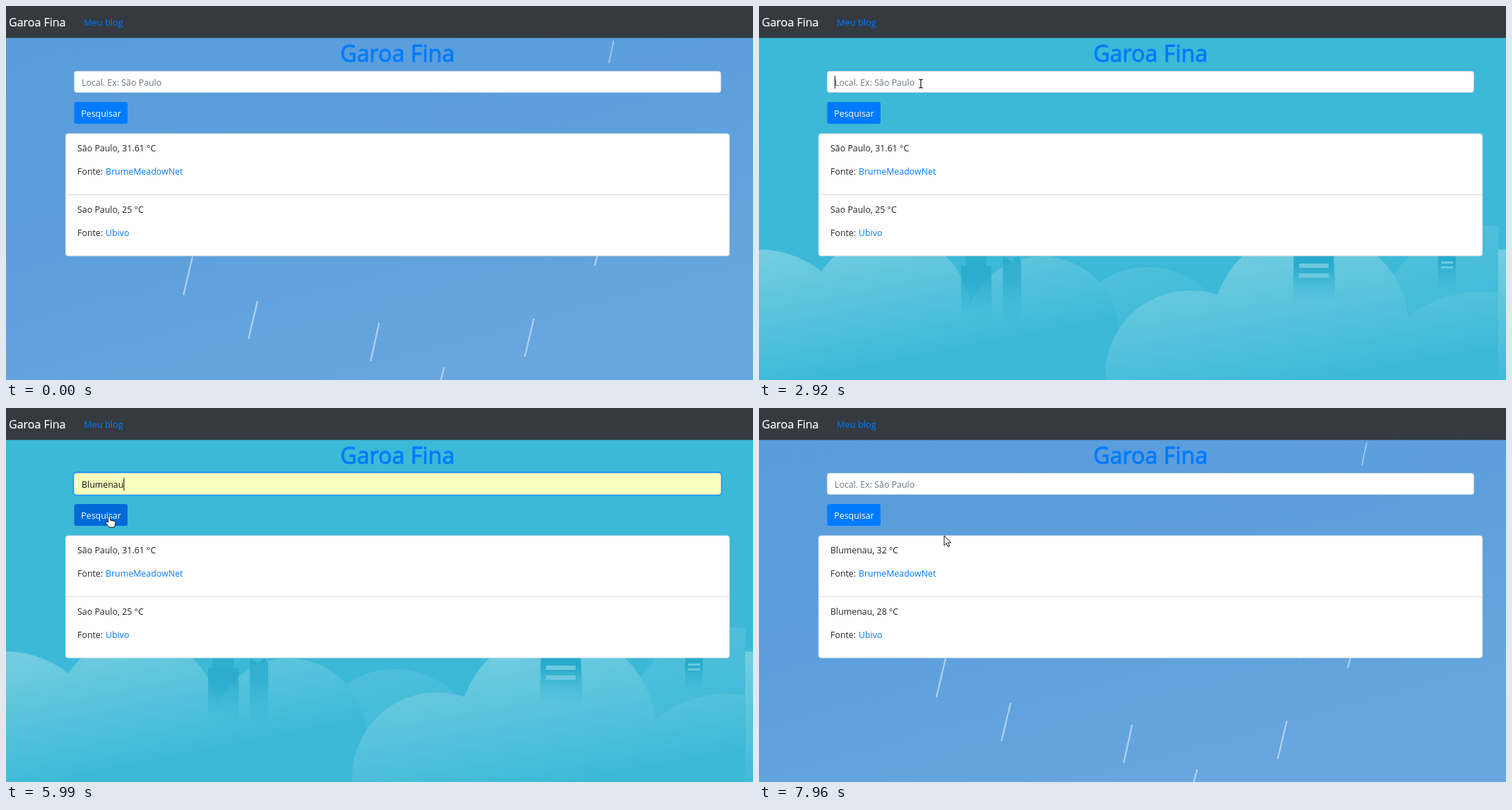
Write an HTML page that moves like this. It is 1057x530 px and loops after 8000 ms.

```html
<!DOCTYPE html>
<html lang="pt-BR">
<head>
<meta charset="utf-8">
<title>Garoa Fina</title>
<style>
  html, body { margin: 0; width: 100%; height: 100%; overflow: hidden; background: #5b9edc; }
  svg { display: block; width: 100%; height: 100%; font: 12.4px "Open Sans", "Noto Sans", sans-serif; fill: #212529; }
  .link { fill: #007bff; }
  .title { font-size: 32.2px; stroke: #007bff; stroke-width: .9; }
  .brand { font-size: 16px; fill: #fff; stroke: #fff; stroke-width: .2; }
  .rain { stroke: #fff; stroke-opacity: .5; stroke-width: 2.2; }
  .ring { fill: none; stroke: #1690f4; stroke-width: 3; stroke-opacity: .75; }
  #menu { font-size: 10px; }
  #menu .panel { fill: #fff; filter: drop-shadow(0 1px 1.5px rgba(0, 0, 0, .45)); }
  #pointer path { fill: #fff; stroke: #111; stroke-width: 1; stroke-linejoin: round; }
  #pointer .beam { fill: none; stroke-width: 1.2; }
</style>
</head>
<body>
<svg viewBox="0 0 1057 530" preserveAspectRatio="none">
  <defs>
    <linearGradient id="sky" x1="0" y1="0" x2=".55" y2="1">
      <stop stop-color="#599cdb"/><stop offset=".5" stop-color="#5c9fdc"/><stop offset="1" stop-color="#67a6de"/>
    </linearGradient>
    <linearGradient id="leftMist" gradientUnits="userSpaceOnUse" x1="0" y1="345" x2="38" y2="535">
      <stop stop-color="#75cee1"/><stop offset="1" stop-color="#3db9d8"/>
    </linearGradient>
    <linearGradient id="rightMist" gradientUnits="userSpaceOnUse" x1="690" y1="316" x2="730" y2="541">
      <stop stop-color="#78cfe2"/><stop offset="1" stop-color="#3db9d8"/>
    </linearGradient>
    <linearGradient id="haze" x1=".3" y1="0" x2=".5" y2=".5">
      <stop stop-color="#50c0db"/><stop offset="1" stop-color="#3db9d8"/>
    </linearGradient>
    <linearGradient id="tower" x1="0" y1="0" x2="0" y2="1">
      <stop stop-color="#25a8cb"/><stop offset=".3" stop-color="#29abce"/><stop offset="1" stop-color="#3db9d8" stop-opacity="0"/>
    </linearGradient>
    <clipPath id="tile"><rect width="1046" height="530"/></clipPath>
    <clipPath id="nextTile"><rect x="1046" width="11" height="530"/></clipPath>
  </defs>

  <rect width="1057" height="530" fill="url(#sky)"/>
  <g class="rain">
    <path d="M860 49L853 81" stroke-width="1.6"/>
    <path d="M264 355L251 410M356 418L343 472M528 449L516 503M747 443L734 497M839 345L833 368M620 512L614 535M766 346L764 355"/>
  </g>

  <g id="clouds">
    <rect width="1057" height="530" fill="#3db9d8"/>
    <g clip-path="url(#tile)">
      <g fill="url(#haze)">
        <circle cx="1030" cy="470" r="159"/>
        <circle cx="550" cy="490" r="120"/>
      </g>
      <g id="leftClouds" fill="url(#leftMist)">
        <circle cx="0" cy="485" r="140"/>
        <circle cx="185" cy="440" r="116"/>
        <circle cx="400" cy="465" r="110"/>
      </g>
      <g fill="url(#rightMist)">
        <circle cx="610" cy="523" r="120"/>
        <circle cx="780" cy="455" r="139"/>
        <circle cx="1020" cy="564" r="159"/>
      </g>
      <g fill="url(#tower)">
        <g opacity=".75">
          <path d="M292 350H322V368H292Z" fill="#2aacce"/>
          <path d="M286 368H329V455H286Z"/>
          <path d="M345 354L358 362L366 354L371 362V460H345Z"/>
        </g>
        <path d="M757 345H813L816 422H755Z"/>
        <path d="M961 345H986V407H961Z"/>
      </g>
      <path d="M764 365H806V371H764ZM764 379H806V385H764ZM965 362H982V365H965ZM965 369H982V372H965Z" fill="#6cc9df"/>
    </g>
    <g clip-path="url(#nextTile)"><use href="#leftClouds" x="1046"/></g>
  </g>

  <rect width="1057" height="45.3" fill="#343a40"/>
  <text class="brand" x="4" y="29">Garoa Fina</text>
  <text class="link" x="110" y="27.5" font-size="12.8">Meu blog</text>
  <text class="link title" x="554" y="78.5" text-anchor="middle">Garoa Fina</text>

  <rect id="fieldRing" class="ring" x="96" y="91.5" width="916" height="31.5" rx="4"/>
  <rect id="field" x="96.5" y="92.5" width="915" height="30" rx="3.3" stroke="#ced4da"/>
  <text id="query" x="107" y="113"></text>
  <path id="caret" d="M0 99V117" stroke="#111"/>

  <rect id="buttonRing" class="ring" x="95.5" y="135" width="77.5" height="33" rx="4"/>
  <rect id="button" x="96.5" y="136" width="75.5" height="31" rx="3.3"/>
  <text x="134.5" y="156.5" text-anchor="middle" fill="#fff">Pesquisar</text>

  <rect x="84.5" y="181" width="939" height="173" rx="3.3" fill="#fff" stroke="#dfe3e6"/>
  <path d="M85 267.5H1023" stroke="#dfdfdf"/>
  <text id="first" x="101" y="206"></text>
  <text x="101" y="239">Fonte:</text>
  <text class="link" x="141" y="239">BrumeMeadowNet</text>
  <text id="second" x="101" y="292.5"></text>
  <text x="101" y="325.5">Fonte:</text>
  <text class="link" x="141" y="325.5">Ubivo</text>

  <g id="menu">
    <rect class="panel" x="96.5" y="124" width="109" height="191.5" rx="2"/>
    <rect id="highlight" x="97" width="108" height="29.7" fill="#ececec"/>
  </g>

  <g id="status">
    <path d="M0 523.5H361Q364.5 523.5 364.5 527V530H0Z" fill="#fff"/>
    <text x="19" y="535.5" font-size="9.5" fill="#777">aguardando dados</text>
  </g>

  <g id="pointer">
    <path class="arrow" d="M0 0V13.6L3.2 10.7L5.3 15.5L7.5 14.6L5.4 9.9H9.6Z"/>
    <path class="beam" d="M-3 -6H-1L0 -5L1 -6H3M0 -5V5M-3 6H-1L0 5L1 6H3"/>
    <path class="hand" d="M-1.5 9V1Q0 -1 1.5 1V6L8 7.5Q9 8 9 10L7.5 16H0L-5 10Q-5 8 -3.5 8Z"/>
  </g>
</svg>

<script>
const LOOP = 8000;
const places = ["São Paulo", "Blumenau", "Minas Gerais", "aaa", "São paulo", "asdsa"];
const rowTop = 131, rowHeight = 29.7;

// [ms, x, y] of the mouse
const route = [
  [50, 815, 474], [810, 229, 110], [3350, 229, 110], [3480, 236, 109], [3910, 236, 109],
  [3980, 200, 130], [4350, 166, 167], [5030, 166, 167], [5560, 146, 153], [6300, 146, 153],
  [6820, 365, 194], [7690, 365, 194], [7960, 262, 181]
];

const $ = id => document.getElementById(id);
const pointer = $("pointer");
const within = (v, from, to) => v >= from && v < to;
const ramp = (t, from, to) => Math.min(1, Math.max(0, (t - from) / (to - from)));
const show = (node, on) => node.setAttribute("visibility", on ? "visible" : "hidden");

function put(id, text) {
  if ($(id).textContent !== text) $(id).textContent = text;
}

places.forEach((place, i) => {
  const label = document.createElementNS("http://www.w3.org/2000/svg", "text");
  label.setAttribute("x", 106.5);
  label.setAttribute("y", 149 + i * rowHeight);
  label.textContent = place;
  $("menu").append(label);
});

function mouseAt(t) {
  const next = route.findIndex(point => point[0] > t);
  if (next < 0) return route[route.length - 1].slice(1);
  if (next === 0) return route[0].slice(1);
  const [t0, x0, y0] = route[next - 1], [t1, x1, y1] = route[next];
  const k = ramp(t, t0, t1), eased = k * k * (3 - 2 * k);
  return [x0 + (x1 - x0) * eased, y0 + (y1 - y0) * eased];
}

function cloudOpacity(t) {
  if (!within(t, 880, 7440)) return 0;
  return Math.min(3, Math.floor((t - 880) / 125) + 1) / 3;
}

function draw(t) {
  const [x, y] = mouseAt(t);
  const reloaded = t >= 7440;
  const menuOpen = within(t, 2980, 4840);
  const chosen = within(t, 4840, 7440);
  const row = menuOpen && y > rowTop ? Math.floor((y - rowTop) / rowHeight) : -1;
  const filled = chosen ? "Blumenau" : places[row];

  $("clouds").setAttribute("opacity", cloudOpacity(t));
  put("first", reloaded ? "Blumenau, 32 °C" : "São Paulo, 31.61 °C");
  put("second", reloaded ? "Blumenau, 28 °C" : "Sao Paulo, 25 °C");

  put("query", filled || "Local. Ex: São Paulo");
  $("query").setAttribute("fill", filled ? "#111" : "#6c757d");
  $("field").setAttribute("fill", filled ? "#faffbd" : "#fff");
  $("fieldRing").setAttribute("opacity", ramp(t, 2890, 3050) - ramp(t, 6140, 6300));

  show($("caret"), within(t, 2920, 3450) || within(t, 3970, 4530) ||
    within(t, 4840, 5430) || within(t, 5990, 6170));
  $("caret").setAttribute("transform", `translate(${
    chosen ? 107.5 + $("query").getComputedTextLength() : 107.5})`);

  show($("menu"), menuOpen);
  show($("highlight"), row >= 0);
  $("highlight").setAttribute("y", rowTop + Math.max(0, row) * rowHeight - .5);

  const onField = within(x, 97, 1011) && within(y, 92, 123);
  const onButton = !menuOpen && within(x, 97, 172) && within(y, 136, 166.5);
  $("button").setAttribute("fill", onButton ? "#0069d9" : "#007bff");
  $("buttonRing").setAttribute("opacity", reloaded ? 0 : ramp(t, 6140, 6300));
  show($("status"), within(t, 6250, 7760));

  const shape = onField ? "beam" : onButton ? "hand" : "arrow";
  for (const path of pointer.children) {
    show(path, t >= 50 && path.classList.contains(shape));
  }
  pointer.setAttribute("transform", `translate(${x} ${y})`);
}

const start = performance.now();
function tick() {
  draw((performance.now() - start) % LOOP);
  requestAnimationFrame(tick);
}
tick();
</script>
</body>
</html>
```
